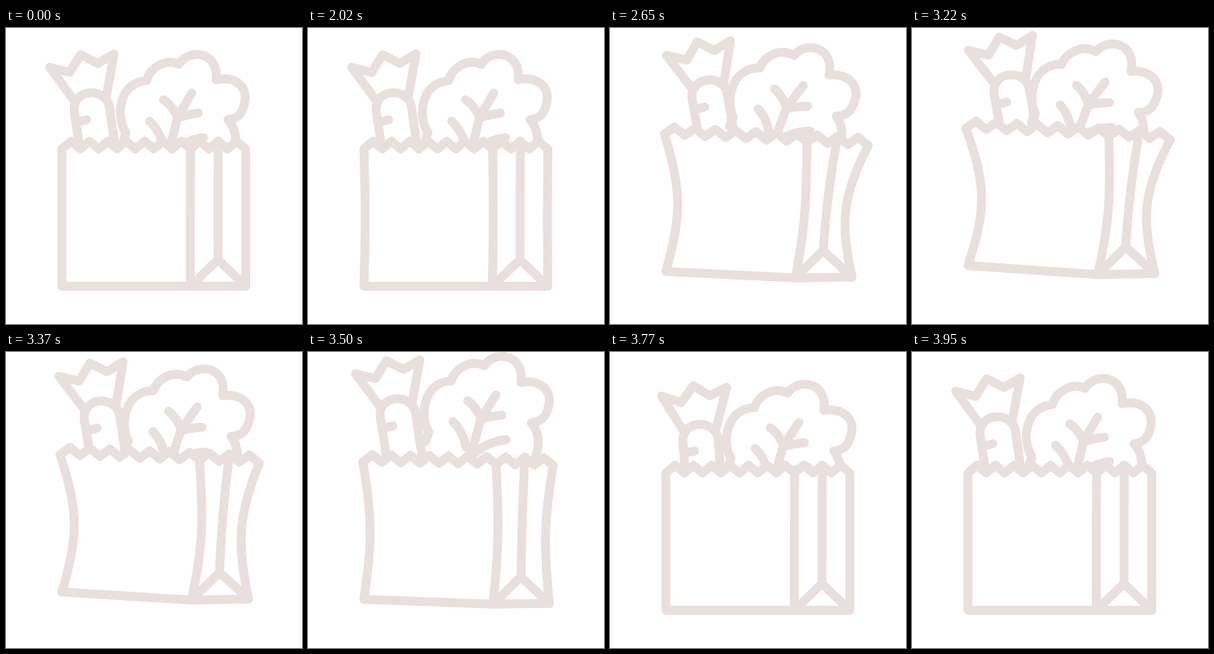
Write an HTML page with a canvas that moves like this. It is 400x400 px and loops after 3.97 s.

```html
<!DOCTYPE html>
<html lang="en">
<head>
<meta charset="utf-8">
<title>Grocery bag</title>
<style>
html, body { margin: 0; width: 100%; height: 100%; overflow: hidden; background: #fff; }
canvas { display: block; width: 100vmin; height: 100vmin; }
</style>
</head>
<body>
<canvas id="stage" width="400" height="400"></canvas>
<script>
const ctx = document.getElementById('stage').getContext('2d');
const LOOP = 3970, START = 2020, INK = '#e9dfdc', TEETH = 20;

const carrot = new Path2D(
  'M100 165L92 112C90 80 137 80 140 108L148 165M97 127L109 124' +
  'M92 98L59 53L86 60L101 36L124 48L146 35L135 95');
const broccoli = new Path2D(
  'M158 154L162 141C148 120 152 74 190 71C194 55 214 40 234 49C246 28 288 30 284 70' +
  'C310 64 326 80 323 98S314 122 300 124Q316 142 307 170' +
  'M213 97Q222 102 231 118M251 88L232 120L221 165M260 115Q245 117 233 121' +
  'M194 126Q208 138 213 160M220 173Q238 152 267 148');

const ramp = (t, a, b) => Math.min(1, Math.max(0, (t - a) / (b - a)));
const ease = (t, a, b) => { const u = ramp(t, a, b); return u * u * (3 - 2 * u); };
const pulse = (t, a, b) => Math.sin(Math.PI * ramp(t, a, b));

// The bag is grabbed and tipped, heaved once more, then let go: it drops and squashes
// while the vegetables fly on, sink too deep and settle.
function motionAt(t) {
  if (t < START) t = 0;
  const heave = ease(t, 3000, 3220);
  return {
    lift: (20 * ease(t, 2010, 2400) + 8 * heave) * (1 - ramp(t, 3240, 3620) ** 2),
    lean: 25 * ease(t, 2010, 2400) * (1 - ease(t, 3220, 3660)),
    pinch: (16 * ease(t, 1920, 2400) + 2.5 * heave) * (1 - ease(t, 3300, 3680)),
    squash: pulse(t, 3590, 3770),
    fly: pulse(t, 3400, 3710),
    sink: pulse(t, 3710, 3950)
  };
}

function drawVeg(path, px, py, x, y, angle) {
  ctx.save();
  ctx.translate(px + x, py + y);
  ctx.rotate(angle);
  ctx.translate(-px, -py);
  ctx.stroke(path);
  ctx.restore();
}

// Curve from (x0,y0) to (x1,y1) that passes through x = mid halfway.
function bend(path, x0, y0, x1, y1, mid) {
  const x = (8 * mid - x0 - x1) / 6, dy = y1 - y0;
  path.bezierCurveTo(x, y0 + dy * .4, x, y0 + dy * .6, x1, y1);
}

function drawBag({ lift, lean, pinch, squash }) {
  const left = 75.5 - lift * .1, right = 324 + lean;
  const top = 163.5 - lift + 8 * squash, tilt = lean * .62;
  const rim = i => [
    left + (right - left) * i / TEETH,
    top + tilt * i / TEETH - (i % 2) * 10.5
  ];
  const foot = [75.5, 349 - lift];
  const fold = [249 + lift * .07, 349 - lift * .56];
  const heel = [324 + lift * .15, 349 - lift * .62];
  const apex = [286.5 + lift * .08, heel[1] - 36];

  const body = new Path2D();
  for (let i = 0; i <= TEETH; i++) body.lineTo(...rim(i));
  bend(body, ...rim(TEETH), ...heel, 324 - pinch * .35 + 23 * squash);
  body.lineTo(...fold);
  body.lineTo(...foot);
  bend(body, ...foot, ...rim(0), 75.5 + pinch - 24 * squash);
  body.closePath();

  const folds = new Path2D();
  folds.moveTo(...rim(14));
  bend(folds, ...rim(14), ...fold, 249 + pinch * .9 + 8 * squash);
  folds.lineTo(...apex);
  folds.lineTo(...heel);
  const [x, y] = rim(17);
  folds.moveTo(x, y);
  folds.quadraticCurveTo(apex[0] + (x - apex[0]) * .25, (y + apex[1]) / 2, ...apex);

  ctx.fill(body);
  ctx.stroke(body);
  ctx.stroke(folds);
}

function frame() {
  const m = motionAt(performance.now() % LOOP);
  ctx.fillStyle = '#fff';
  ctx.fillRect(0, 0, 400, 400);
  ctx.strokeStyle = INK;
  ctx.lineWidth = 12;
  ctx.lineCap = ctx.lineJoin = 'round';
  drawVeg(carrot, 100, 160,
    m.lean * .8 + m.sink * 4,
    m.lift * -.85 - m.fly * 13.5 + m.sink * 12.7,
    m.lean * -.001 + m.sink * .1);
  drawVeg(broccoli, 235, 150,
    m.lean * .13 + m.sink * 1.4,
    m.lift * -.62 - m.fly * 25 + m.sink * 9,
    m.lean * .0045 + m.sink * .07);
  drawBag(m);
  requestAnimationFrame(frame);
}
frame();
</script>
</body>
</html>
```
